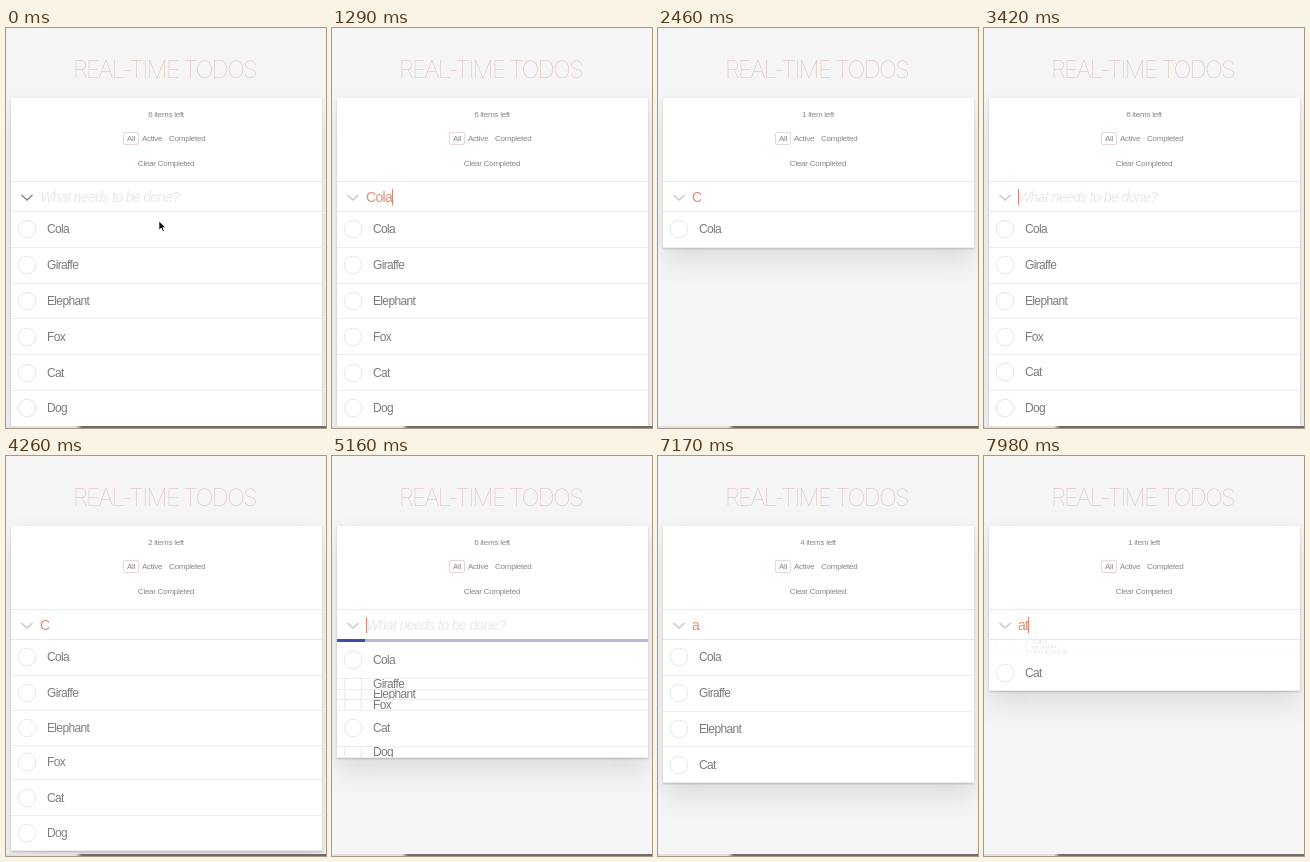
Write an HTML page that moves like this. It is 320x400 px and loops after 8000 ms.

```html
<!DOCTYPE html>
<html lang="en">
<head>
<meta charset="utf-8">
<title>Real-time todos</title>
<style>
  html, body { margin: 0; width: 100%; height: 100%; overflow: hidden; background: #f5f5f5; }
  #stage {
    position: relative; width: 320px; height: 400px; overflow: hidden;
    font: 12px "Liberation Sans", Arial, sans-serif; color: #7c7c7c;
  }
  #stage * { box-sizing: border-box; }
  #stage div, #stage svg { position: absolute; white-space: pre; }
  #title {
    left: 0; width: 317px; top: 26px; text-align: center;
    font: 100 24px/31px Inter, Roboto, sans-serif; letter-spacing: -1.8px; color: #dfbcb6;
  }
  #panel { left: 5px; top: 70px; width: 311px; overflow: hidden; background: #fff; }
  #shadow {
    left: 5px; top: 70px; width: 311px;
    box-shadow: 0 1px 2px rgba(0, 0, 0, .2), 0 13px 25px rgba(0, 0, 0, .1);
  }
  .small { font-size: 8px; line-height: 12px; letter-spacing: -.25px; color: #868686; }
  .center { left: 0; width: 310px; text-align: center; }
  #all { left: 112px; top: 34px; width: 16px; height: 13px; border: 1px solid #e6d6d4; border-radius: 2px; }
  #field { left: 0; top: 83px; width: 311px; height: 31px; border: solid #e9e9e9; border-width: 1px 0; }
  #typed, #hint { left: 29px; top: 7px; font-size: 14px; line-height: 17px; }
  #typed { letter-spacing: -.7px; color: #d99079; }
  #hint { letter-spacing: -.6px; font-style: italic; color: #e8e8e8; }
  #caret { top: 7px; width: 1px; height: 16px; background: #e0806c; }
  #track { left: 0; top: 113px; width: 311px; height: 3px; background: #b6bad2; }
  #bar { left: 0; top: 0; height: 3px; background: #3f4ca8; }
  .row { left: 0; width: 311px; overflow: hidden; border-bottom: 1px solid #ececec; }
  .row div { left: 36px; top: 50%; line-height: 16px; margin-top: -8px; letter-spacing: -.65px; }
  .row svg { left: 6px; top: 50%; margin-top: -10px; }
  #edge {
    left: 0; top: 398px; width: 320px; height: 2px;
    background: linear-gradient(90deg, #e2e2e2 0 70px, #6c6c6c 76px);
  }
</style>
</head>
<body>
<div id="stage">
  <div id="title">REAL-TIME TODOS</div>
  <div id="shadow"></div>
  <div id="panel">
    <div id="count" class="small center" style="top:11px"></div>
    <div id="all"></div>
    <div class="small" style="left:116px;top:35px">All</div>
    <div class="small" style="left:131px;top:35px">Active</div>
    <div class="small" style="left:158px;top:35px">Completed</div>
    <div class="small center" style="top:60px">Clear Completed</div>
    <div id="field">
      <svg width="16" height="12" style="left:8px;top:10px" fill="none" stroke-width="1.6">
        <path id="chevron" d="M2.5 3 L8 8 L13.5 3"/>
      </svg>
      <div id="hint">What needs to be done?</div>
      <div id="typed"></div>
      <div id="caret"></div>
    </div>
    <div id="track"><div id="bar"></div></div>
  </div>
  <div id="edge"></div>
  <svg id="pointer" width="10" height="14" style="left:0;top:0">
    <path d="M1 1 V10 L3.2 8.1 L4.8 11.6 L6.3 10.9 L4.8 7.6 H7.5 Z" fill="#111" stroke="#fff" stroke-width=".6"/>
  </svg>
</div>
<script>
  const LOOP = 8000, ROW = 35.8, SHIFT = 500, BLINK = 450, LIST_TOP = 114;
  const FOCUS = 500;
  const ITEMS = ["Cola", "Giraffe", "Elephant", "Fox", "Cat", "Dog"];
  const KEYS = [
    [0, ""], [750, "C"], [900, "Co"], [1050, "Col"], [1200, "Cola"],
    [1800, "Col"], [1900, "Co"], [2000, "C"], [2500, ""],
    [3800, "C"], [4720, ""], [5700, "a"], [7540, "at"]
  ];
  // Search results arrive a moment after the typing.
  const RESULTS = [[0, ""], [1640, "Cola"], [2940, ""], [4240, "C"], [5060, ""], [6140, "a"], [7700, "at"]];
  const LOADS = [[2860, 3140], [4980, 5260]];

  const $ = id => document.getElementById(id);
  const clamp = x => Math.min(1, Math.max(0, x));
  const show = (el, visible) => { el.style.display = visible ? "" : "none"; };
  const matches = (item, query) => item.includes(query);
  const lastIndex = (list, t) => list.findLastIndex(([start]) => start <= t);

  // cubic-bezier(.25, .1, .25, 1)
  function ease(x) {
    const curve = (a, b, s) => 3 * a * s * (1 - s) ** 2 + 3 * b * s * s * (1 - s) + s ** 3;
    let low = 0, high = 1;
    for (let i = 0; i < 20; i++) {
      const mid = (low + high) / 2;
      if (curve(.25, .25, mid) < x) low = mid; else high = mid;
    }
    return curve(.1, 1, low);
  }

  const rows = ITEMS.map(name => {
    const row = document.createElement("div");
    row.className = "row";
    row.innerHTML = `<svg width="20" height="20"><circle cx="10" cy="10" r="8.8" fill="none" stroke="#e6e6e6"/></svg><div>${name}</div>`;
    $("panel").append(row);
    return row;
  });

  function drawField(t) {
    const [since, text] = KEYS[lastIndex(KEYS, t)];
    const focused = t >= FOCUS;
    const phase = Math.floor((t - Math.max(since, FOCUS)) / BLINK);
    $("typed").textContent = text;
    show($("hint"), !text);
    show($("caret"), focused && phase % 2 === 0);
    $("caret").style.left = 29 + $("typed").offsetWidth + "px";
    $("chevron").setAttribute("stroke", focused ? "#cacaca" : "#8a8a8a");
  }

  function drawList(t) {
    const index = lastIndex(RESULTS, t);
    const [since, query] = RESULTS[index];
    const before = RESULTS[Math.max(0, index - 1)][1];
    const progress = ease(clamp((t - since) / SHIFT));
    const load = LOADS.find(([from, to]) => t >= from && t < to);
    show($("track"), load);
    if (load) $("bar").style.width = (t - load[0]) * 28 / 180 + "px";

    let y = LIST_TOP + (load ? 3 : 0);
    rows.forEach((row, i) => {
      const from = +matches(ITEMS[i], before), to = +matches(ITEMS[i], query);
      const size = from + (to - from) * progress;
      show(row, size > .002);
      row.style.top = y + "px";
      row.style.height = size * ROW + "px";
      row.style.opacity = to ? 1 : size;
      y += size * ROW;
    });
    $("panel").style.height = $("shadow").style.height = y + "px";
    const left = ITEMS.filter(item => matches(item, query)).length;
    $("count").textContent = `${left} ${left === 1 ? "item" : "items"} left`;
  }

  function drawPointer(t) {
    const move = ease(clamp((t - 150) / 300));
    show($("pointer"), t < KEYS[1][0]);
    $("pointer").style.transform = `translate(${152 - 14 * move}px, ${192 - 22 * move}px)`;
  }

  const start = performance.now();
  function draw(now) {
    const t = Math.max(0, now - start) % LOOP;
    drawField(t);
    drawList(t);
    drawPointer(t);
    requestAnimationFrame(draw);
  }
  draw(start);
</script>
</body>
</html>
```
